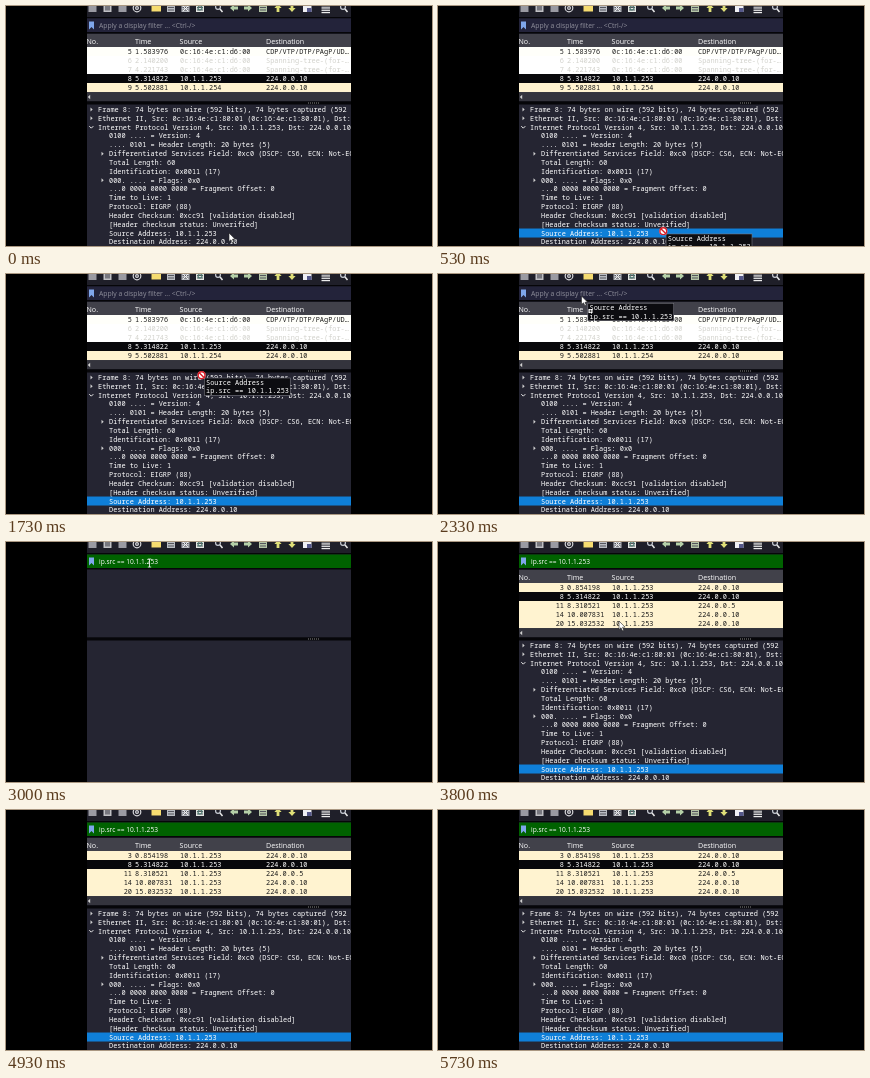
Animation, 426 px wide and 240 px high, one loop 5.79 s. Source, as an HTML page with a canvas:

```html
<!DOCTYPE html>
<html lang="en">
<head>
<meta charset="utf-8">
<style>
html, body { margin: 0; width: 100%; height: 100%; overflow: hidden; background: #000; }
canvas { display: block; width: 426px; height: 240px; }
</style>
</head>
<body>
<canvas id="stage"></canvas>
<script>
const W = 426, H = 240, LOOP = 5790;
const LEFT = 81, RIGHT = 345, STEP = 8.83;
const MONO = '6.92px "Noto Sans Mono", "DejaVu Sans Mono", monospace';
const sans = size => `${size}px "Open Sans", "Noto Sans", sans-serif`;
const BG = '#252532', EDGE = '#060609', INK = '#fff', CREAM = '#fff3d0';

// Moments of the interaction, in ms
const SELECT = 330, DRAG = 520, DROP = 2480, BLANK = 2900, FILL = 3180, GONE = 4750;

const cv = document.getElementById('stage');
const c = cv.getContext('2d');
const dpr = window.devicePixelRatio || 1;
cv.width = W * dpr;
cv.height = H * dpr;

const details = [
  [92, 'Frame 8: 74 bytes on wire (592 bits), 74 bytes captured (592 bits)', '>'],
  [92, 'Ethernet II, Src: 0c:16:4e:c1:80:01 (0c:16:4e:c1:80:01), Dst: ', '>'],
  [92, 'Internet Protocol Version 4, Src: 10.1.1.253, Dst: 224.0.0.10', 'v'],
  [103, '0100 .... = Version: 4'],
  [103, '.... 0101 = Header Length: 20 bytes (5)'],
  [103, 'Differentiated Services Field: 0xc0 (DSCP: CS6, ECN: Not-ECT)', '>'],
  [103, 'Total Length: 60'],
  [103, 'Identification: 0x0011 (17)'],
  [103, '000. .... = Flags: 0x0', '>'],
  [103, '...0 0000 0000 0000 = Fragment Offset: 0'],
  [103, 'Time to Live: 1'],
  [103, 'Protocol: EIGRP (88)'],
  [103, 'Header Checksum: 0xcc91 [validation disabled]'],
  [103, '[Header checksum status: Unverified]'],
  [103, 'Source Address: 10.1.1.253'],
  [103, 'Destination Address: 224.0.0.10']
];

// number, time, source, destination, background, text colour
const MAC = '0c:16:4e:c1:d6:00', HOST = '10.1.1.253', GROUP = '224.0.0.10';
const allRows = [
  ['5', '1.583976', MAC, 'CDP/VTP/DTP/PAgP/UD…', '#fffffa', '#1c1c1c'],
  ['6', '2.140200', MAC, 'Spanning-tree-(for-…', '#fff', '#d2d2cc'],
  ['7', '4.221743', MAC, 'Spanning-tree-(for-…', '#fff', '#d2d2cc'],
  ['8', '5.314822', HOST, GROUP, '#08080b', '#fff'],
  ['9', '5.502881', '10.1.1.254', GROUP, CREAM, '#1c1c1c']
];
const matchRows = [
  ['3', '0.854198', HOST, GROUP, CREAM, '#1c1c1c'],
  ['8', '5.314822', HOST, GROUP, '#08080b', '#fff'],
  ['11', '8.310521', HOST, '224.0.0.5', CREAM, '#1c1c1c'],
  ['14', '10.007831', HOST, GROUP, CREAM, '#1c1c1c'],
  ['20', '15.032532', HOST, GROUP, CREAM, '#1c1c1c']
];

// Pointer path: time, x, y
const path = [
  [0, 223, 227], [380, 220, 227], [1130, 237, 167], [1350, 232, 158],
  [2150, 146, 26], [2330, 143.5, 22], [3000, 143.5, 21], [3250, 143.5, 21],
  [3800, 181, 79], [4250, 183, 82], [GONE, 352, 150]
];

function pointer(t) {
  for (let i = 1; i < path.length; i++) {
    const [t0, x0, y0] = path[i - 1], [t1, x1, y1] = path[i];
    if (t > t1) continue;
    const u = (t - t0) / (t1 - t0), e = u * u * (3 - 2 * u);
    return [x0 + (x1 - x0) * e, y0 + (y1 - y0) * e];
  }
  return path[path.length - 1].slice(1);
}

function box(x, y, w, h, col) {
  c.fillStyle = col;
  c.fillRect(x, y, w, h);
}

// y is the vertical middle of the line
function text(s, x, y, col, font = MONO, align = 'left') {
  c.font = font;
  c.fillStyle = col;
  c.textAlign = align;
  c.fillText(s, x, y + 2.5);
}

function line(pts, col, w = 1) {
  c.strokeStyle = col;
  c.lineWidth = w;
  c.beginPath();
  pts.forEach(([x, y], i) => i ? c.lineTo(x, y) : c.moveTo(x, y));
  c.stroke();
}

function poly(pts, col) {
  c.fillStyle = col;
  c.beginPath();
  pts.forEach(([x, y]) => c.lineTo(x, y));
  c.closePath();
  c.fill();
}

function ring(x, y, r, col, w = 1.2) {
  c.strokeStyle = col;
  c.lineWidth = w;
  c.beginPath();
  c.arc(x, y, r, 0, Math.PI * 2);
  c.stroke();
}

function lens(x) {
  ring(x - 1, 1, 2.4, '#c8ccd4');
  line([[x + 1, 3], [x + 3.5, 6]], '#e8e8e8', 1.5);
}

function arrow(x, turn) {
  c.save();
  c.translate(x, 2);
  c.rotate(turn * Math.PI / 2);
  poly([[4, 0], [0, -3.6], [0, -1.4], [-4, -1.4], [-4, 1.4], [0, 1.4], [0, 3.6]],
    turn % 2 ? '#dfdf78' : '#b5d0a8');
  c.restore();
}

function page(x, col = '#b9bcc2') {
  box(x - 4, -2, 8, 8, col);
  box(x - 3, 1, 6, 1, '#55565e');
  box(x - 3, 3.5, 6, 1, '#55565e');
}

function toolbar() {
  box(LEFT, 0, RIGHT - LEFT, 11, '#1f1f29');
  box(82.5, -1, 8, 7, '#9a9aa2');
  box(97.5, -2, 8, 8, '#c0c0c4');
  box(99, -1, 5, 5.5, '#77777f');
  box(112.5, -1, 8, 7, '#9a9aa2');
  ring(131, 2, 3.8, '#d8d8dc');
  ring(131, 2, 1.4, '#d8d8dc');
  box(145.5, -1, 9.5, 6.5, '#f6dc70');
  page(165);
  page(179.5);
  line([[177, 0], [182, 5]], '#eee');
  line([[182, 0], [177, 5]], '#eee');
  page(194, '#e4e8e4');
  ring(194, 2, 2, '#4f7a72');
  lens(213);
  arrow(228, 2);
  arrow(242, 0);
  page(257, '#b4c4a6');
  arrow(272, 3);
  arrow(286, 1);
  box(297, -1, 8.5, 7, '#f0f0f4');
  box(301, 2, 4.5, 4, '#55588a');
  for (let y = -1; y < 6; y += 2.3) box(315.5, y, 8.5, 1.3, '#ececec');
  lens(338);
  box(LEFT, 11, RIGHT - LEFT, 1.5, EDGE);
}

function filterBar(applied) {
  box(LEFT, 12.5, RIGHT - LEFT, 13.5, applied ? '#006200' : '#23233a');
  poly([[83, 15.5], [88, 15.5], [88, 23.5], [85.5, 21], [83, 23.5]], '#7fa6ea');
  if (applied) text('ip.src == 10.1.1.253', 93, 19.8, INK, sans(6.6));
  else text('Apply a display filter ... <Ctrl-/>', 93, 19.8, '#90909c', sans(6.8));
  box(LEFT, 26, RIGHT - LEFT, 1.5, EDGE);
}

function packetList(rows) {
  box(LEFT, 28, RIGHT - LEFT, 13, '#41414a');
  [['No.', 80.5], ['Time', 129], ['Source', 173.5], ['Destination', 260]]
    .forEach(([s, x]) => text(s, x, 35.7, INK, sans(7.1)));
  rows.forEach(([no, time, src, dst, bg, ink], i) => {
    const y = 41 + i * 9, mid = y + 4.8;
    box(LEFT, y, RIGHT - LEFT, 9.1, bg);
    text(no, 126, mid, ink, MONO, 'right');
    text(time, 129, mid, ink);
    text(src, 174, mid, ink);
    text(dst, 260, mid, ink);
  });
  box(LEFT, 86.5, RIGHT - LEFT, 8.5, '#34343d');
  poly([[84.2, 88.8], [81.8, 91], [84.2, 93.2]], '#d0d0d0');
}

function detailPane(selected) {
  details.forEach(([x, s, mark], i) => {
    const y = 103.5 + i * STEP, m = x - 7.5;
    if (selected && i === 14) box(LEFT, y - 4.6, RIGHT - LEFT, 9, '#0f7fd8');
    text(s, x, y, INK);
    if (mark === '>') poly([[m, y - 2], [m + 2.2, y], [m, y + 2]], '#d0d0d0');
    if (mark === 'v') line([[m - 1.2, y - 1], [m + 0.8, y + 1], [m + 2.8, y - 1]], '#eee', 1);
  });
}

function mouse(x, y) {
  const shape = [[0, 0], [0, 8.5], [2, 6.8], [3.4, 9.8], [4.8, 9.2], [3.5, 6.3], [6, 6.1]]
    .map(([a, b]) => [x + a, y + b]);
  poly(shape, '#fff');
  line([...shape, shape[0]], '#222', 0.6);
}

function copyBadge(x, y) {
  box(x, y, 4, 4, '#fff');
  box(x + 1.6, y + 0.7, 0.8, 2.6, '#333');
  box(x + 0.7, y + 1.6, 2.6, 0.8, '#333');
}

function noDrop(x, y) {
  c.fillStyle = '#fff';
  c.beginPath();
  c.arc(x, y, 4, 0, Math.PI * 2);
  c.fill();
  ring(x, y, 3.4, '#d81e28', 1.4);
  line([[x - 2.4, y - 2.4], [x + 2.4, y + 2.4]], '#d81e28', 1.4);
}

function tooltip(x, y) {
  box(x, y, 86.5, 18, '#777780');
  box(x + 0.6, y + 0.6, 85.3, 16.8, '#0c0c10');
  text('Source Address', x + 2, y + 4.7, INK);
  text('ip.src == 10.1.1.253', x + 2, y + 13.2, INK);
}

function beam(x, y) {
  line([[x, y - 4], [x, y + 4]], '#eee', 0.9);
  line([[x - 1.7, y - 4], [x + 1.7, y - 4]], '#eee', 0.8);
  line([[x - 1.7, y + 4], [x + 1.7, y + 4]], '#eee', 0.8);
}

function draw(t) {
  const applied = t >= DROP, blank = t >= BLANK && t < FILL;
  c.setTransform(dpr, 0, 0, dpr, 0, 0);
  box(0, 0, W, H, '#000');
  c.save();
  c.beginPath();
  c.rect(LEFT, 0, RIGHT - LEFT, H);
  c.clip();
  box(LEFT, 0, RIGHT - LEFT, H, BG);
  toolbar();
  filterBar(applied);
  if (!blank) {
    packetList(t < FILL ? allRows : matchRows);
    detailPane(t >= SELECT);
  }
  box(LEFT, 95.3, RIGHT - LEFT, 3.2, EDGE);
  for (let x = 302; x < 313; x += 2) box(x, 96.5, 1, 1, '#888');

  const [x, y] = pointer(t);
  if (t >= DRAG && t < DROP) {
    tooltip(x + 6, y + 7);
    if (y > 27) noDrop(x + 3.5, y + 4.5);
    else {
      mouse(x, y);
      copyBadge(x + 7, y + 13);
    }
  } else if (applied && y < 26) beam(x, y);
  else if (t < GONE) mouse(x, y);
  c.restore();
}

const start = performance.now();
function tick() {
  draw((performance.now() - start) % LOOP);
  requestAnimationFrame(tick);
}
tick();
</script>
</body>
</html>
```
